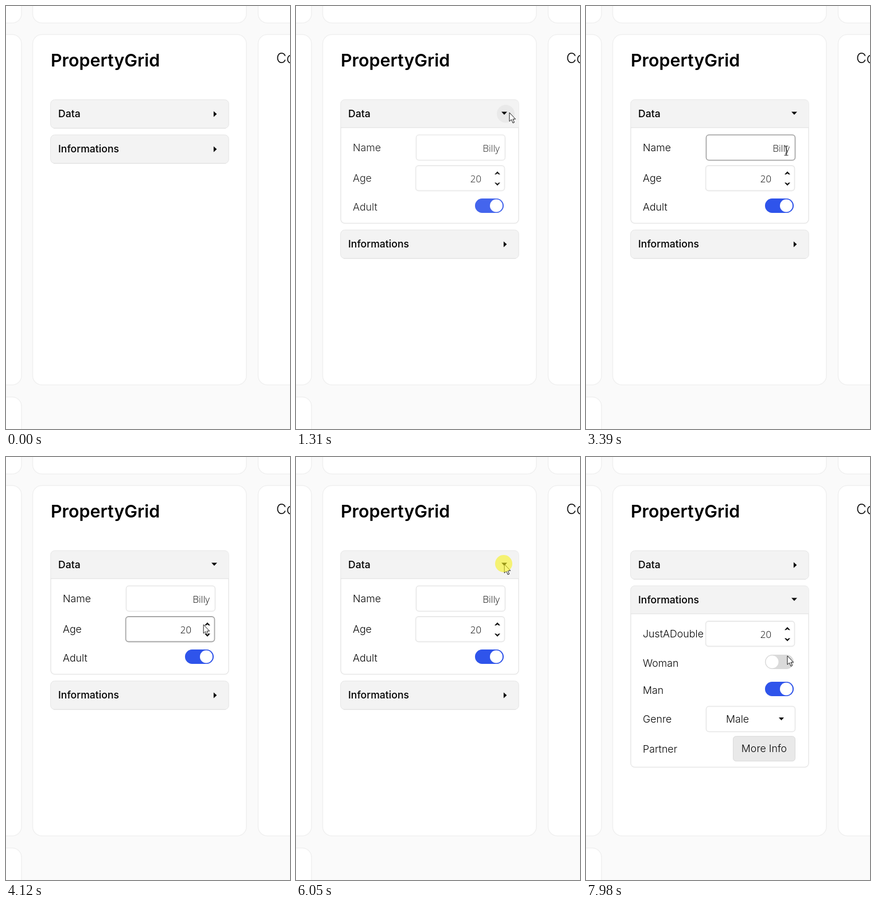
An HTML page that plays this animation: 495 px wide and 734 px high, repeating every 8 s.

```html
<!DOCTYPE html>
<html lang="en">
<head>
<meta charset="utf-8">
<style>
  html, body { margin: 0; width: 100%; height: 100%; overflow: hidden; background: #fafafa; }
  svg { display: block; font: 300 17.8px Inter, sans-serif; font-optical-sizing: none; fill: #080808; }
  .card { fill: #fff; stroke: #f0f0f0; stroke-width: 1.5; }
  .title { font-size: 30.4px; font-weight: 600; fill: #000; }
  .next { font-size: 24.5px; }
  .head { font-size: 17.6px; font-weight: 500; fill: #000; }
  .bar { fill: #f3f3f3; stroke: #e6e6e6; }
  .frame { fill: #fff; stroke: #e8e8e8; stroke-width: 1.5; }
  .field { fill: #fff; stroke: #e9e9e9; stroke-width: 1.8; }
  .field.hover { stroke: #a8a8a8; }
  .value { font: 350 16.8px "Open Sans", sans-serif; text-anchor: end; }
  .mid { text-anchor: middle; }
  .button { fill: #e9e9e9; stroke: #dadada; }
  .off { fill: #dadada; }
  .on { fill: #2f54eb; }
</style>
</head>
<body>
<svg id="stage" width="495" height="734" viewBox="0 0 495 734"></svg>
<script>
const LOOP = 8000;
const stage = document.getElementById('stage');

// Markup helpers
const rect = (cls, x, y, w, h, r, more = '') =>
  `<rect class="${cls}" x="${x}" y="${y}" width="${w}" height="${h}" rx="${r}" ${more}/>`;
const text = (cls, x, y, s) => `<text class="${cls}" x="${x}" y="${y}">${s}</text>`;
const label = (y, s) => text('label', 99, y, s);
const path = (d, x, y, more = '') => `<path d="${d}" transform="translate(${x} ${y})" ${more}/>`;
const card = (x, y, w, h) => rect('card', x, y, w, h, 16);
const DOWN = 'M-5-2.5H5L0 2.7z';
const RIGHT = 'M-2.5-5V5L3 0z';

const textField = y => rect('field', 209.5, y, 155, 44, 5);
const spinner = (y, n) => rect('field', 208.7, y, 154.8, 43.5, 5) +
  text('value', 323, y + 29, n) +
  path('M-5 2.7L0-2.5 5 2.7H2.4L0 .9-2.4 2.7z', 351, y + 12.5) +
  path('M-5-2.7L0 2.5 5-2.7H2.4L0-.9-2.4-2.7z', 351, y + 32.3);
const toggle = (y, on, id = '') => `<g id="${id}">` +
  rect('off', 312, y, 50, 25, 12.5) +
  rect('on', 312, y, 50, 25, 12.5, `opacity="${on}"`) +
  `<circle cx="${324.5 + 24.5 * on}" cy="${y + 12.5}" r="11" fill="#fff"/></g>`;

// An expander drawn from its own top edge
const section = (id, y, name, height, body) => `<g id="${id}" transform="translate(0 ${y})">
  <g class="open">
    ${rect('frame', 78, .8, 310, height, 7)}
    <path d="M78.5 48.5V8q0-7 7-7H381q7 0 7 7V48.5z" fill="#f3f3f3"/>
    <path d="M78 49H388" stroke="#e6e6e6" stroke-width="1.5"/>
    <g class="body">${body}</g>
  </g>
  <g class="shut">${rect('bar', 77.7, .7, 310.6, 49.3, 7)}
    <path d="M83 50.2H383" stroke="#e2e2e2"/></g>
  <circle class="ripple" cx="365.5" cy="25" r="15.5" fill="#e9e9e9"/>
  ${text('head', 91, 31, name)}
  ${path(RIGHT, 364.4, 25.5, 'class="shut"')}
  ${path(DOWN, 363, 24, 'class="open"')}
</g>`;

const dataBody = label(90, 'Name') + textField(61.7) + text('value', 355, 91, 'Billy') +
  label(143, 'Age') + spinner(115, 20) +
  label(193, 'Adult') + toggle(172, 1, 'adult');

const infoBody = label(90, 'JustADouble') + spinner(62, 20) +
  label(141, 'Woman') + toggle(120, 0) +
  label(188, 'Man') + toggle(167, 1) +
  label(238, 'Genre') + textField(209.7) + text('mid', 264, 238, 'Male') +
  path('M-4.5-2.5H4.5L0 2.5z', 340.5, 231.5) +
  label(290, 'Partner') + rect('button', 256.5, 261.7, 108, 43, 5) + text('mid', 310.5, 289, 'More Info');

stage.innerHTML =
  card(-100, -60, 127, 89.5) + card(46.5, -60, 372.5, 89.5) + card(439.5, -60, 200, 89.5) +
  card(-100, 49.5, 127, 608) + card(46.5, 49.5, 372.5, 608) + card(439.5, 49.5, 200, 608) +
  card(-100, 678.5, 127, 200) +
  text('title', 78, 105, 'PropertyGrid') + text('next', 471, 99, 'Co') +
  section('data', 162, 'Data', 214.2, dataBody) +
  section('info', 223, 'Informations', 314.5, infoBody) +
  `<g id="cursor">
    <path id="arrow" d="M.5 0V15.2L4 12 6.5 18 9 17 6.5 11.2H11z" fill="#fff" stroke="#000" stroke-width=".9"/>
    <path id="beam" d="M-3.5-8H-1Q0-8 0-7Q0-8 1-8H3.5M0-7V7M-3.5 8H-1Q0 8 0 7Q0 8 1 8H3.5" fill="none" stroke="#222" stroke-width="1.2"/>
    <circle id="press" cx="-.7" cy="-1" r="15" fill="rgba(246,242,30,.6)"/>
  </g>`;

const $ = id => document.getElementById(id);
const data = $('data'), info = $('info');
const fields = [...stage.querySelectorAll('.field')];

// Pointer stops: time, x, y
const stops = [
  [110, 411, 628], [650, 371.5, 185], [1510, 371.5, 185], [1950, 352, 246], [2310, 350, 296],
  [2370, 350, 296], [2640, 351, 305], [3130, 352, 244], [3190, 352, 244], [3380, 349, 251],
  [3480, 349, 251], [3720, 343, 262], [3860, 343, 262], [4520, 345, 345.5], [5120, 345, 345.5],
  [5450, 363, 191], [5520, 363, 191], [5650, 362.7, 186], [6250, 362.7, 186],
  [6710, 368.8, 253], [7720, 368.8, 253], [7980, 350.5, 345]
];
const presses = [[980, 1190], [4660, 4920], [5000, 5130], [6050, 6250], [6980, 7200]];

const ramp = (t, a, b) => Math.min(1, Math.max(0, (t - a) / (b - a)));
const ease = p => p * p * (3 - 2 * p);
const within = (t, a, b) => t >= a && t < b;
const show = (el, on) => el.style.display = on ? '' : 'none';

function pointer(t) {
  let i = 0;
  while (i < stops.length - 2 && t >= stops[i + 1][0]) i++;
  const [a, x, y] = stops[i], [b, u, v] = stops[i + 1];
  const p = ease(ramp(t, a, b));
  return [x + (u - x) * p, y + (v - y) * p];
}

function setSection(el, y, open, fade, ripple) {
  el.setAttribute('transform', `translate(0 ${y})`);
  el.querySelectorAll('.open').forEach(e => show(e, open));
  el.querySelectorAll('.shut').forEach(e => show(e, !open));
  el.querySelector('.body').style.opacity = fade;
  el.querySelector('.ripple').style.opacity = ripple;
}

function rippleAt(t, start, end) {
  return t < start ? 0 : 1 - ramp(t, end - 60, end);
}

function draw(t) {
  const [x, y] = pointer(t);
  const dataOpen = within(t, 1060, 6110), infoOpen = t >= 7040;
  const infoY = dataOpen ? 388 : 223;
  setSection(data, 162, dataOpen, ramp(t, 1060, 1340),
    t < 5000 ? rippleAt(t, 980, 1370) : rippleAt(t, 6100, 6450));
  setSection(info, infoY, infoOpen, ramp(t, 7040, 7340), rippleAt(t, 6980, 7520));

  // Toggle is switched off, then on again
  const on = 1 - ease(ramp(t, 4700, 4820)) + ease(ramp(t, 5030, 5150));
  const [, blue, knob] = $('adult').children;
  blue.setAttribute('opacity', on);
  knob.setAttribute('cx', 324.5 + 24.5 * on);

  let beam = false;
  fields.forEach((f, i) => {
    const inData = data.contains(f);
    const top = f.y.baseVal.value + (inData ? 162 : infoY);
    const hit = (inData ? dataOpen : infoOpen) && x > 209 && x < 364 &&
      y > top && y < top + f.height.baseVal.value;
    f.classList.toggle('hover', hit);
    if (hit && i === 0) beam = true;
  });

  show($('cursor'), t >= 110);
  $('cursor').setAttribute('transform', `translate(${x} ${y})`);
  show($('arrow'), !beam);
  show($('beam'), beam);
  show($('press'), presses.some(([a, b]) => within(t, a, b)));
}

const begin = performance.now();
function tick() {
  draw((performance.now() - begin) % LOOP);
  requestAnimationFrame(tick);
}
tick();
</script>
</body>
</html>
```
